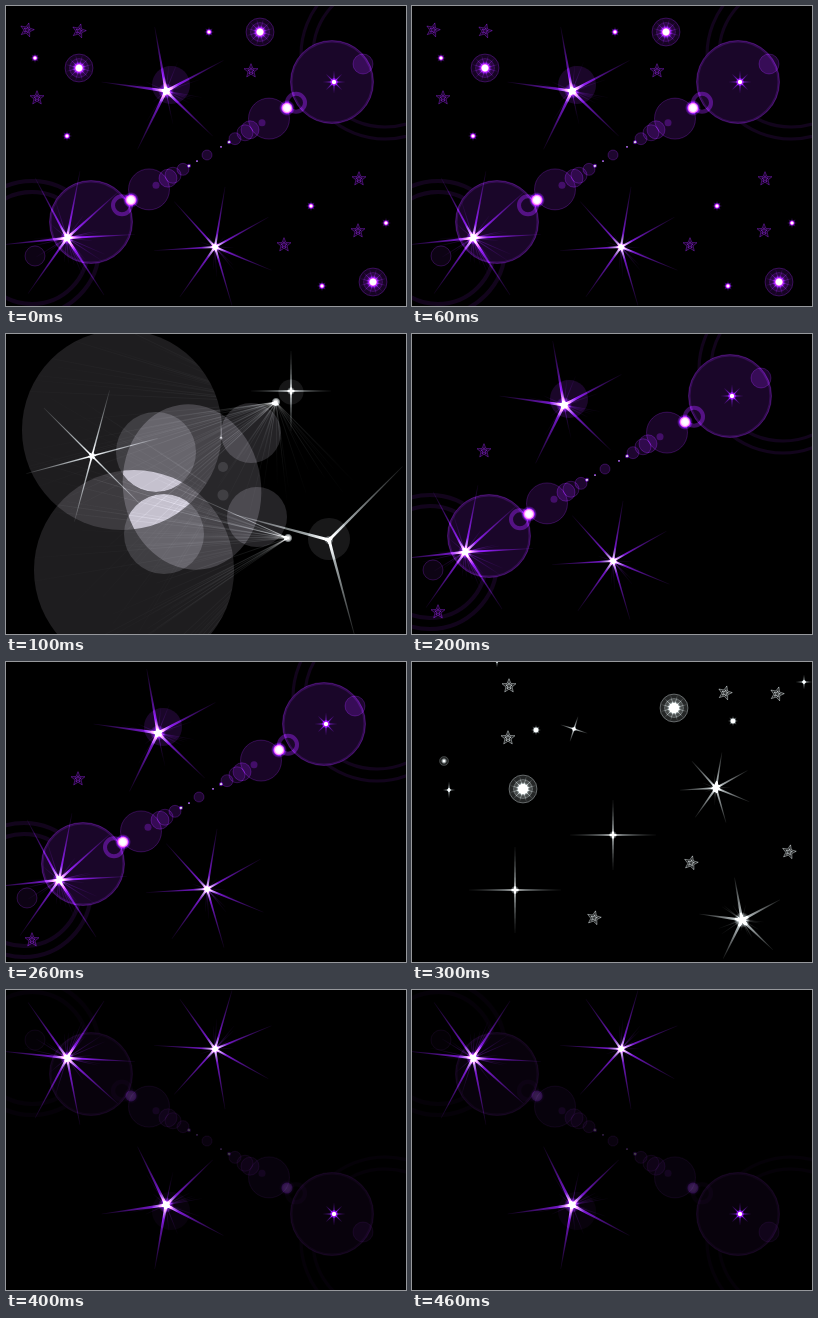
An HTML page with a canvas for the animation above (500 ms loop, 400x300 px).

```html
<!DOCTYPE html>
<html lang="en">
<head>
<meta charset="utf-8">
<title>Lens flares</title>
<style>
  html, body { margin: 0; width: 100%; height: 100%; overflow: hidden; background: #000; }
  canvas { display: block; }
</style>
</head>
<body>
<canvas id="stage" width="400" height="300"></canvas>
<script>
const ctx = document.getElementById('stage').getContext('2d');
const TAU = Math.PI * 2, RAD = Math.PI / 180;
const VIOLET = '125,25,215', PLUM = '105,22,165', GREY = '180,188,190', WHITE = '255,255,255';
const rgba = (c, a) => `rgba(${c},${a})`;

function seeded(seed) {
  return () => (seed = (seed * 16807) % 2147483647) / 2147483647;
}

function oval(x, y, rx, ry = rx, tilt = 0) {
  ctx.beginPath();
  ctx.ellipse(x, y, rx, ry, tilt, 0, TAU);
}

function ring(x, y, r, c, a, width = 1) {
  oval(x, y, r);
  ctx.strokeStyle = rgba(c, a);
  ctx.lineWidth = width;
  ctx.stroke();
}

function fill(shape, c, a) {
  oval(...shape);
  ctx.fillStyle = rgba(c, a);
  ctx.fill();
}

function disc(x, y, r, c, a, rim = 0) {
  fill([x, y, r], c, a);
  if (rim) ring(x, y, r, c, rim);
}

function glow(x, y, r, c, a = 1, core = 0.3) {
  const g = ctx.createRadialGradient(x, y, 0, x, y, r);
  g.addColorStop(0, rgba(WHITE, a));
  g.addColorStop(core, rgba(WHITE, a * 0.8));
  g.addColorStop(core + 0.25, rgba(c, a * 0.7));
  g.addColorStop(1, rgba(c, 0));
  oval(x, y, r);
  ctx.fillStyle = g;
  ctx.fill();
}

// Tapered spike, white at its root and fading to the tip.
function ray(x, y, deg, len, width, c, a = 1) {
  const g = ctx.createLinearGradient(0, 0, len, 0);
  g.addColorStop(0, rgba(WHITE, a));
  g.addColorStop(0.22, rgba(c, a * 0.9));
  g.addColorStop(0.6, rgba(c, a * 0.5));
  g.addColorStop(1, rgba(c, a * 0.1));
  ctx.save();
  ctx.translate(x, y);
  ctx.rotate(deg * RAD);
  ctx.beginPath();
  ctx.moveTo(0, -width / 2);
  ctx.lineTo(len, -0.3);
  ctx.lineTo(len, 0.3);
  ctx.lineTo(0, width / 2);
  ctx.fillStyle = g;
  ctx.fill();
  ctx.restore();
}

function star(x, y, n, start, len, c, width, core) {
  for (let i = 0; i < n; i++) ray(x, y, start + i * 360 / n, len, width, c);
  glow(x, y, core, c);
}

// Faint lines of random length between two angles.
function fan(x, y, from, to, n, len, c, a) {
  const rnd = seeded(x * 31 + y);
  for (let i = 0; i < n; i++)
    ray(x, y, from + rnd() * (to - from), len * (0.4 + rnd() * 0.6), 0.9, c, a);
}

function fiveStar(x, y, len, c) {
  fan(x, y, 0, 360, 18, len * 0.6, c, 0.3);
  star(x, y, 5, -100, len, c, 3, 8);
}

function sevenStar(x, y, len, c) {
  fan(x, y, 0, 360, 14, len * 0.5, c, 0.3);
  star(x, y, 7, -80.5, len, c, 2.2, 5);
}

function cross(x, y, w, h, tilt = 0) {
  for (let i = 0; i < 4; i++) ray(x, y, tilt + i * 90, i % 2 ? h : w, 1.6, GREY);
  glow(x, y, 2 + w / 20, GREY);
}

function pentagram(x, y, c, tilt = 0) {
  for (const r of [7.3, 3.4]) {
    ctx.beginPath();
    for (let i = 0; i < 10; i++) {
      const t = (i * 36 - 90 + tilt) * RAD, d = i % 2 ? r * 0.44 : r;
      ctx.lineTo(x + d * Math.cos(t), y + d * Math.sin(t));
    }
    ctx.closePath();
    ctx.lineWidth = 1;
    ctx.fillStyle = rgba(c, 0.15);
    ctx.fill();
    ctx.strokeStyle = rgba(c, 0.55);
    ctx.stroke();
  }
}

function burst(x, y, c) {
  star(x, y, 8, 0, 5, c, 1.8, 3.5);
}

function orb(x, y, c) {
  disc(x, y, 14, c, 0.2, 0.4);
  disc(x, y, 9.5, c, 0.2, 0.25);
  star(x, y, 12, 15, 13, c, 0.6, 7);
  glow(x, y, 6, c, 0.6, 0.5);
}

// Two outlined stars, a burst and an orb, turned as a group.
function cluster(x, y, turn, c) {
  const cos = Math.cos(turn * RAD), sin = Math.sin(turn * RAD);
  const put = (shape, dx, dy) => shape(x + dx * cos - dy * sin, y + dx * sin + dy * cos, c, turn / 6);
  put(pentagram, 0, 0);
  put(pentagram, -1, 52);
  put(burst, 27, 44);
  put(orb, 14, 103);
}

// Chain of lens ghosts; k dims the ghosts, the stars keep their strength.
function flare(k) {
  const ghost = (x, y, r, a = 0.28) => disc(x, y, r, PLUM, a * k, 0.35 * k);
  const pair = (s, shape) => [s, -s].forEach(d => shape(203 + d, 148 - d * 0.59));

  for (const r of [84, 72]) ring(379, 49, r, PLUM, 0.17 * k, 3);
  for (const r of [67, 56]) ring(26, 242, r, PLUM, 0.17 * k, 4);

  // The large lenses hide the rings behind them.
  for (const [x, y] of [[326, 76], [85, 216]]) {
    ctx.globalCompositeOperation = 'source-over';
    disc(x, y, 41.5, '0,0,0', 1);
    ctx.globalCompositeOperation = 'lighter';
    ghost(x, y, 41.5, 0.25);
    ring(x, y, 40.5, PLUM, 0.25 * k, 2);
  }
  ghost(357, 58, 10);
  ghost(29, 250, 10, 0.12);
  ghost(201, 149, 5);

  pair(60, (x, y) => ghost(x, y, 20.5, 0.24));
  pair(41, (x, y) => ghost(x, y, 9));
  pair(36, (x, y) => ghost(x, y, 8, 0.18));
  pair(26, (x, y) => ghost(x, y, 6));
  pair(53, (x, y) => disc(x, y, 3.5, PLUM, 0.4 * k));
  pair(87, (x, y) => ring(x, y, 9, PLUM, 0.55 * k * k, 4));
  pair(78, (x, y) => {
    disc(x, y, 5.5, VIOLET, 0.75 * k);
    glow(x, y, 8, VIOLET, k * k, 0.45);
  });
  pair(20, (x, y) => glow(x, y, 2.5, VIOLET, k));
  pair(12, (x, y) => glow(x, y, 1.5, VIOLET, k));

  disc(165, 79, 19, PLUM, 0.25 * k);
  fiveStar(160, 85, 65, VIOLET);
  sevenStar(209, 241, 61, VIOLET);

  fan(61, 232, 0, 360, 26, 45, VIOLET, 0.35);
  for (const deg of [-118, -79, -42, -3, 57, 125, 174]) ray(61, 232, deg, 68, 2.4, VIOLET);
  glow(61, 232, 7, VIOLET);
  star(328, 76, 8, -90, 11, VIOLET, 1.5, 4.5);
}

function purpleSky() {
  flare(1);
  cluster(353, 173, 0, PLUM);
  cluster(73, 25, 90, PLUM);
  for (const [x, y] of [[31, 92], [245, 65], [278, 239]]) pentagram(x, y, PLUM);
  for (const [x, y] of [[203, 26], [61, 130], [305, 200], [316, 280]]) burst(x, y, VIOLET);
  for (const [x, y] of [[73, 62], [254, 26]]) orb(x, y, PLUM);
}

function shiftedSky() {
  ctx.translate(-8, -14);
  flare(1);
  pentagram(80, 131, PLUM);
  pentagram(34, 292, PLUM);
}

function flippedSky() {
  ctx.translate(0, 300);
  ctx.scale(1, -1);
  flare(0.3);
}

function within(shapes, paint) {
  ctx.save();
  for (const shape of shapes) {
    oval(...shape);
    ctx.clip();
  }
  paint();
  ctx.restore();
}

function greyLenses() {
  const tint = '198,196,208';
  const upper = [116, 96, 100], lower = [128, 236, 100], middle = [186, 153, 69, 83, -0.15];
  const lenses = [[150, 118, 40], [158, 200, 40]];
  const spots = [[270, 68], [282, 204]];

  for (const big of [upper, lower]) {
    fill(big, tint, 0.15);
    within([big], () => spots.forEach(([x, y]) => fan(x, y, 120, 215, 50, 290, GREY, 0.06)));
  }
  fill(middle, tint, 0.2);
  for (const lens of lenses) {
    fill(lens, tint, 0.17);
    // Where four lenses meet the light nearly burns out.
    within([upper, lower, middle, lens], () => fill(lens, tint, 0.32));
  }
  fill([245, 99, 30], tint, 0.18);
  fill([251, 183, 30], tint, 0.18);
  fill([217, 133, 5], tint, 0.12);
  fill([217, 161, 5.5], tint, 0.12);
  fill([285, 58, 12.5], tint, 0.11);
  fill([323, 205, 21], tint, 0.12);

  fan(270, 68, 135, 172, 22, 150, GREY, 0.15);
  fan(270, 68, 40, 125, 26, 115, GREY, 0.11);
  fan(282, 204, 145, 205, 28, 170, GREY, 0.15);
  for (const [x, y] of spots) glow(x, y, 4.5, GREY, 1, 0.5);

  star(86, 122, 6, -15, 68, GREY, 1.7, 4);
  cross(285, 57, 40, 40);
  star(323, 206, 3, 75, 104, GREY, 3, 4.5);
  glow(215, 104, 2, GREY, 0.5);
  ray(215, 104, -90, 22, 1, GREY, 0.3);
}

function whiteStars() {
  cluster(97, 24, 0, GREY);
  cluster(365, 32, 90, GREY);
  for (const [x, y] of [[279, 201], [377, 190], [182, 256]]) pentagram(x, y, GREY, 12);
  disc(32, 99, 4.5, GREY, 0.2, 0.2);
  glow(32, 99, 3, GREY);

  cross(37, 128, 6, 8);
  cross(392, 20, 8, 7);
  cross(85, -1, 4, 6);
  cross(162, 67, 14, 13, 18);
  cross(201, 173, 43, 35);
  cross(103, 228, 46, 43);

  sevenStar(304, 126, 36, GREY);
  fill([304.5, 125, 2, 6], WHITE, 0.6);
  fiveStar(330, 258, 43, GREY);
}

const scenes = [purpleSky, greyLenses, shiftedSky, whiteStars, flippedSky];
const STEP = 100;
let shown = -1;

function draw(i) {
  ctx.setTransform(1, 0, 0, 1, 0, 0);
  ctx.globalCompositeOperation = 'source-over';
  ctx.fillStyle = '#000';
  ctx.fillRect(0, 0, 400, 300);
  ctx.globalCompositeOperation = 'lighter';
  scenes[i]();
}

function tick() {
  const i = Math.floor(performance.now() / STEP) % scenes.length;
  if (i !== shown) draw(shown = i);
  requestAnimationFrame(tick);
}
tick();
</script>
</body>
</html>
```
